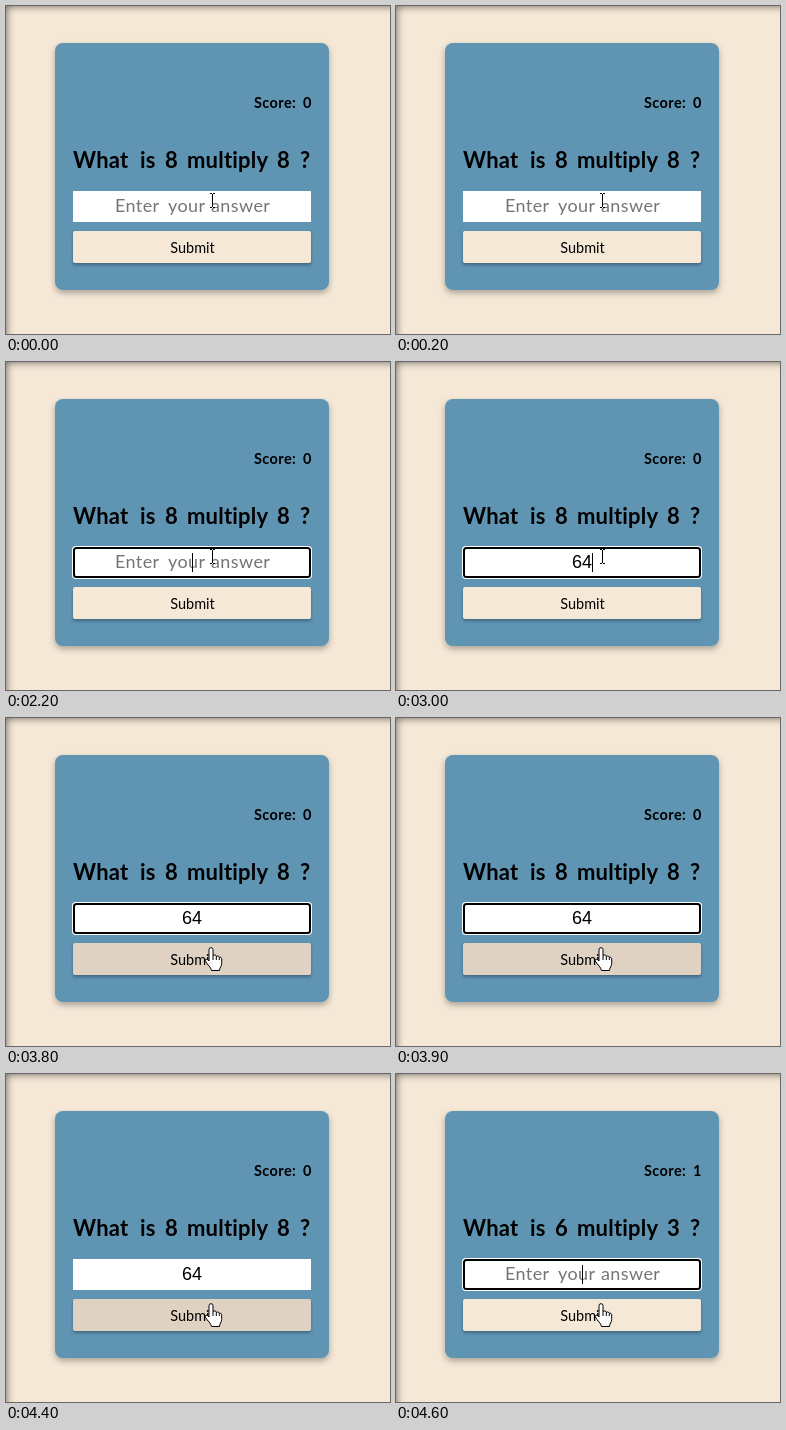
These frames come from a looping animation (384 by 328 pixels, 5 s). An HTML page:

```html
<!DOCTYPE html>
<html lang="en">
<head>
<meta charset="utf-8">
<title>Multiplication quiz</title>
<style>
  html, body { margin: 0; width: 100%; height: 100%; overflow: hidden; }
  body { background: #f5e8d7; box-shadow: inset 6px 6px 8px -6px rgba(0, 0, 0, .6); }
  svg { display: block; font-family: Lato, "Open Sans", sans-serif; font-variant-ligatures: none; }
  .card { fill: #5f94b3; filter: drop-shadow(0 3px 3px rgba(0, 0, 0, .3)); }
  #button { filter: drop-shadow(0 2px 1.5px rgba(0, 0, 0, .3)); }
  #question { font-size: 22px; font-weight: 700; letter-spacing: .2px; }
  #score { font-size: 14.5px; font-weight: 700; letter-spacing: .4px; }
  #hint { font-size: 18px; fill: #757575; letter-spacing: .4px; }
  #typed { font: 18px "Liberation Sans", Arial, sans-serif; text-anchor: middle; }
  #label { font-size: 14.5px; text-anchor: middle; }
</style>
</head>
<body>
<svg width="384" height="328" viewBox="0 0 384 328">
  <rect class="card" x="49" y="37" width="274" height="247" rx="8"/>
  <text id="score" y="102"></text>
  <text id="question" y="162"></text>
  <rect x="67" y="185" width="238" height="31" fill="#fff"/>
  <g id="ring">
    <rect x="66" y="184" width="240" height="33" rx="4" fill="#fff"/>
    <rect x="68" y="186" width="236" height="29" rx="2.5" fill="#fff" stroke="#000" stroke-width="2"/>
  </g>
  <text id="hint" y="206"></text>
  <text id="typed" x="186" y="206"></text>
  <rect id="caret" y="191" width="1" height="19"/>
  <rect id="button" x="67" y="225" width="238" height="32" rx="2"/>
  <text id="label" x="186.5" y="247">Submit</text>
  <path id="beam" d="M204 187.5H206M207 187.5H209M206.5 188V201M204 201.5H206M207 201.5H209" stroke="#000" fill="none"/>
  <g id="hand" transform="translate(198.5 229.5)" stroke="#000" stroke-linejoin="round">
    <path fill="#fff" d="M4.5 2.2a2 2 0 0 1 4 0V8.2a1.8 1.8 0 0 1 3.3 .8a1.8 1.8 0 0 1 3 .9a1.6 1.6 0 0 1 2.4 1.4V16C17.2 19 15 20 15 23H7C6.5 19.5 3 17.5 .8 13.5C0 11.5 2.5 10.8 4.5 13.5Z"/>
    <path fill="none" d="M8.5 8V12.5M11.8 9V12.5M14.8 10V12.5"/>
  </g>
</svg>
<script>
const $ = id => document.getElementById(id);
const show = (id, on) => $(id).setAttribute("visibility", on ? "visible" : "hidden");

// Each word starts at its own x.
function setWords(id, text, xs) {
  if ($(id).dataset.text === text) return;
  $(id).dataset.text = text;
  $(id).innerHTML = text && text.split(" ").map((w, i) => `<tspan x="${xs[i]}">${w}</tspan>`).join("");
}

function draw(now) {
  const t = now % 5000;
  const next = t >= 4500;                      // second question is up
  const typed = t < 2600 || next ? "" : t < 3000 ? "6" : "64";
  const focused = t >= 1200 && t < 4300 || next;
  const keyTime = next ? 4500 : t >= 3000 ? 3000 : t >= 2600 ? 2600 : 1200;
  const blinkOn = Math.floor((t - keyTime) / 500) % 2 === 0;
  const onButton = t >= 3800;

  setWords("score", `Score: ${next ? 1 : 0}`, [248, 297]);
  setWords("question", next ? "What is 6 multiply 3 ?" : "What is 8 multiply 8 ?",
    [67, 134, 159, 181, 271, 294]);
  setWords("hint", typed ? "" : "Enter your answer", [109, 162, 205]);
  $("typed").textContent = typed;

  show("ring", focused);
  show("caret", focused && blinkOn);
  $("caret").setAttribute("x", 186 + 5 * typed.length);
  $("button").setAttribute("fill", onButton && !next ? "#dfd2c2" : "#f5e8d7");

  show("beam", !onButton);
  $("beam").setAttribute("transform", `translate(0 ${t >= 3700 ? 14 : 0})`);
  show("hand", onButton);
  requestAnimationFrame(() => draw(performance.now()));
}
draw(0);
</script>
</body>
</html>
```
